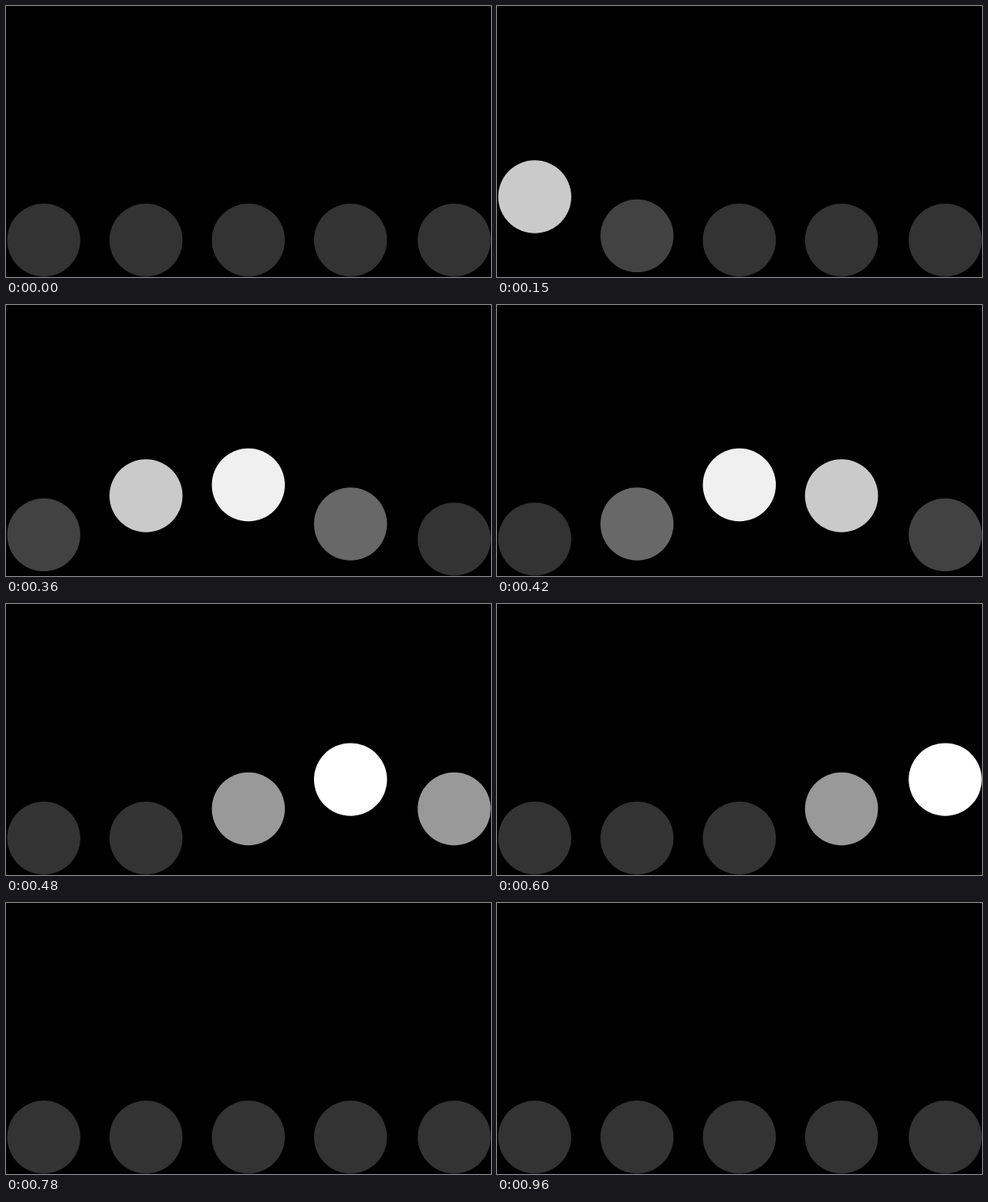
These frames come from a looping animation (600x336 px, 1140 ms). An HTML page:

```html
<!DOCTYPE html>
<html lang="en">
<head>
<meta charset="utf-8">
<title>Bouncing dots</title>
<style>
  html, body { margin: 0; width: 100%; height: 100%; overflow: hidden; background: #000; }
  svg { display: block; width: 100vw; height: 100vh; }
</style>
</head>
<body>
<svg viewBox="0 0 600 336"></svg>
<script>
const LOOP = 1140, STEP = 30;
const RISE = 6, STAGGER = 3;   // in steps
const HOLDS = [5, 17];         // ticks on which the motion pauses
const REST_Y = 290.3, LIFT = 72.7, RADIUS = 45.2;
const CENTERS = [46.7, 173.2, 299.8, 426.2, 554.5];

const svg = document.querySelector('svg');
const dots = CENTERS.map(cx => {
  const dot = document.createElementNS(svg.namespaceURI, 'circle');
  dot.setAttribute('cx', cx);
  dot.setAttribute('r', RADIUS);
  return svg.appendChild(dot);
});

const smooth = t => t * t * (3 - 2 * t);

function draw(ms) {
  const tick = Math.floor((ms % LOOP) / STEP);
  const step = tick - HOLDS.filter(h => tick >= h).length;
  dots.forEach((dot, i) => {
    const k = step - i * STAGGER;
    const height = smooth(Math.max(0, 1 - Math.abs(k - RISE) / RISE));
    const grey = Math.round(51 + 204 * height);
    dot.setAttribute('cy', REST_Y - LIFT * height);
    dot.setAttribute('fill', `rgb(${grey},${grey},${grey})`);
  });
}

const start = performance.now();
function loop() {
  draw(performance.now() - start);
  requestAnimationFrame(loop);
}
loop();
</script>
</body>
</html>
```
